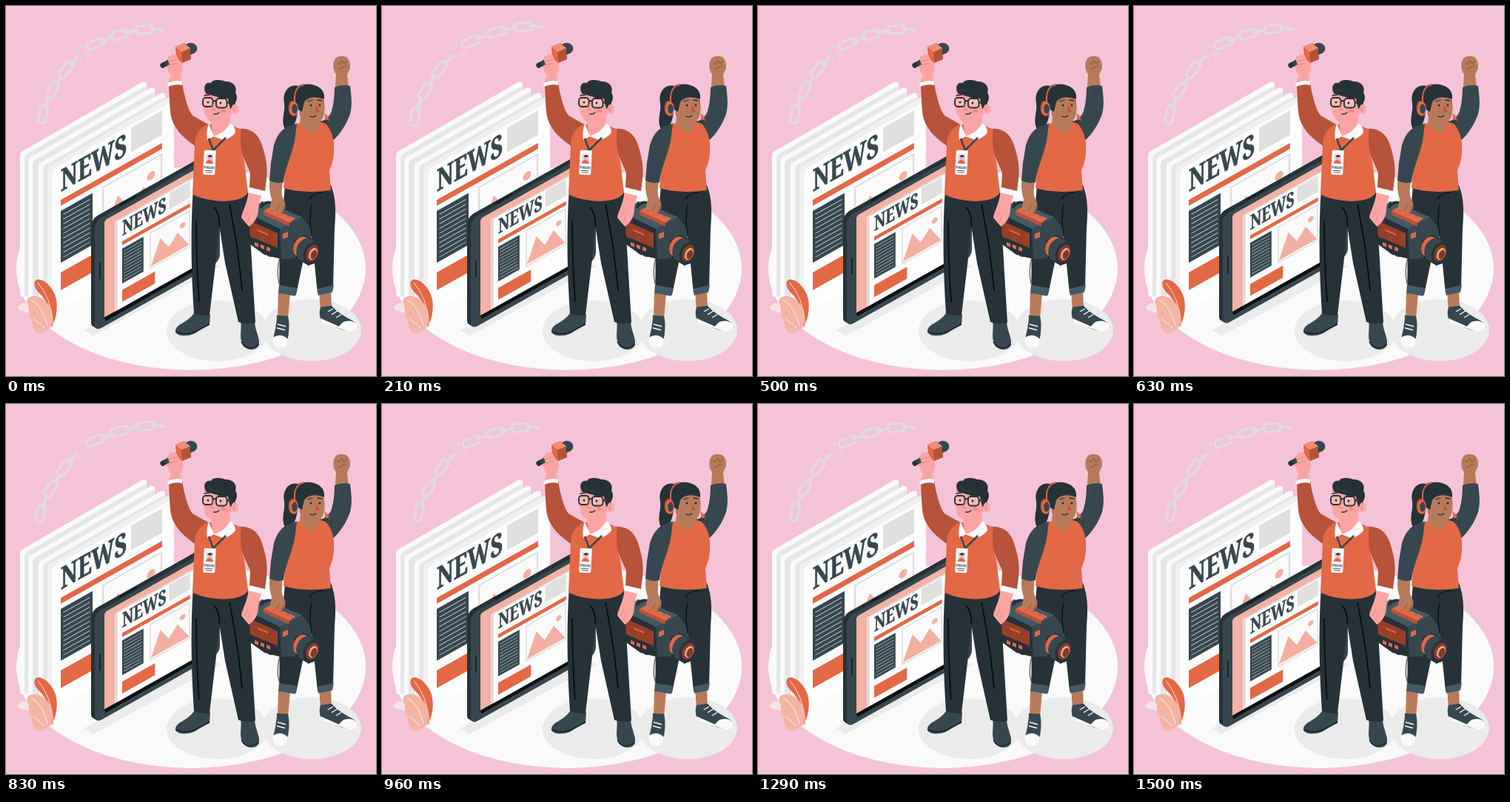
Animation, 500 px wide and 500 px high, one loop 1540 ms. Source, as an HTML page:

```html
<!DOCTYPE html>
<html lang="en">
<head>
<meta charset="utf-8">
<title>News reporters</title>
<style>
html, body { margin: 0; width: 100%; height: 100%; overflow: hidden; background: #f5c3d7; }
svg { display: block; width: 100%; height: 100%; }
.ink { fill: #263238; }
.slate { fill: #37474f; }
.org { fill: #e36846; }
.rust { fill: #b6533a; }
.skin { fill: #fba5a3; }
.brown { fill: #b77a5b; }
.white { fill: #fafafa; }
.grey { fill: #e0e0e0; }
.line { fill: none; stroke: #263238; stroke-width: 1.3; stroke-linecap: round; stroke-linejoin: round; }
.news { font: 700 41px "Noto Serif", serif; fill: #37474f; stroke: #37474f; stroke-width: .7; }
</style>
</head>
<body>
<svg viewBox="0 0 500 500" xmlns="http://www.w3.org/2000/svg">
<defs>
  <g id="page">
    <text class="news" transform="translate(0 -11) scale(.71 1)">NEWS</text>
    <rect class="grey" x="95" y="-44" width="42" height="33"/>
    <rect class="org" width="137" height="8"/>
    <rect class="slate" y="15" width="43" height="70"/>
    <path d="M21.5 21V81" stroke="#b0bec5" stroke-width="36" stroke-dasharray="1.2 5.2"/>
    <rect x="57" y="15" width="79" height="72" fill="#fafafa" stroke="#e0e0e0" stroke-width="2.5"/>
    <path d="M58 83L77 37L94 64L112 45L135 83Z" fill="#f3b0a2"/>
    <circle cx="122" cy="36" r="5.5" fill="#f3b0a2"/>
    <rect class="org" y="98" width="66" height="24"/>
  </g>
  <path id="rim" d="M56 222Q56 218 60 216L219 124Q227 120 227 127V320L64 412Q56 415 56 408Z"/>
  <path id="face" d="M62 226Q62 222 65 220L222 130Q227 127 227 133V320L69 411Q62 415 62 408Z"/>
  <g id="sheet">
    <use href="#rim" fill="#fafafa"/>
    <use href="#face" fill="#e6e6e6"/>
  </g>
  <rect id="link" x="-12" y="-5" width="24" height="10" rx="4"/>
</defs>

<rect width="500" height="500" fill="#f5c3d7"/>
<ellipse class="white" cx="250" cy="355" rx="236" ry="137"/>
<g fill="#ebebeb">
  <ellipse cx="286" cy="439" rx="69" ry="41"/>
  <ellipse cx="413" cy="438" rx="67" ry="42"/>
  <path d="M106 438L118 446L290 352L272 342Z"/>
</g>

<g id="chain" fill="none" stroke="#dfdcdf" stroke-width="3" stroke-linecap="round">
  <use href="#link" transform="translate(50 146) rotate(-78)"/>
  <use href="#link" transform="translate(63 114) rotate(-59)"/>
  <use href="#link" transform="translate(81 86) rotate(-52)"/>
  <use href="#link" transform="translate(121 51) rotate(-22)"/>
  <use href="#link" transform="translate(153 39) rotate(-15)"/>
  <use href="#link" transform="translate(187 32) rotate(-4)"/>
  <path stroke-width="4" d="M53 138L58 123M68 106L75 95M87 79L97 69M129 48L144 42M161 37L177 33M196 31Q206 31 212 33"/>
  <path stroke-width="1.6" d="M99 60L95 57M103 57L102 51M108 57L110 53M105 65L111 68M101 68V73M109 63L114 65"/>
</g>

<use href="#sheet" transform="translate(-37 -20)"/>
<use href="#sheet" transform="translate(-26 -12)"/>
<use href="#sheet" transform="translate(-12 -5)"/>
<use href="#rim" fill="#f0f0f0"/>
<use href="#face" fill="#fdfdfd"/>
<use href="#page" transform="matrix(1 -.562 0 1 74 262)"/>

<g id="leaves">
  <path d="M16 406Q22 399 31 403Q43 413 44 425Q34 414 21 412Q15 411 16 406Z" fill="#f6e4e4"/>
  <path class="org" d="M62 434C69 420 71 403 66 390C60 375 47 367 41 370C35 375 40 384 47 390C56 399 61 414 62 434Z"/>
  <path d="M62 433C64 413 59 399 45 393C33 390 26 395 29 403C33 410 29 417 33 422C37 428 35 435 40 440L46 443Z" fill="#f4b5a5"/>
  <path d="M43 374Q61 394 64 431M34 397Q50 406 56 432M37 422L52 435" fill="none" stroke="#fff" stroke-width=".8"/>
</g>

<g id="phone">
  <g transform="matrix(1 -.562 0 1 115 0)">
    <rect class="ink" y="288" width="169" height="149" rx="9"/>
    <rect class="ink" x="2.500" y="291" width="169" height="149" rx="9"/>
    <rect class="slate" x="5" y="294" width="169" height="149" rx="9"/>
    <rect x="11" y="353" width="2" height="23" rx="1" fill="#17242a"/>
    <path d="M39 291H49M52 291H60" stroke="#111b20" stroke-width="2.500" stroke-linecap="round"/>
    <rect x="18" y="300" width="142" height="137" rx="4" fill="#f2b2a4"/>
    <path d="M18 431H160V437H21Q18 437 18 431Z" fill="#0c1114"/>
    <rect x="32" y="309" width="128" height="122" fill="#e2dedd"/>
    <rect x="36" y="311" width="124" height="120" fill="#fdfdfd"/>
  </g>
  <use href="#page" transform="matrix(.67 -.3765 0 .67 157 318)"/>
</g>

<g id="woman">
  <path class="brown" d="M368 386L384 389L381 423L367 421ZM423 384L439 382L440 410L425 411Z"/>
  <path class="slate" d="M366 418L381 419C384 430 382 445 380 454Q379 461 370 461Q360 460 361 451C363 440 366 430 366 418Z"/>
  <path class="white" d="M361 448Q371 441 381 450Q381 462 370 462Q359 461 361 448Z"/>
  <path class="slate" d="M425 407L440 405C448 414 458 420 468 425Q476 430 472 437Q464 440 454 437L426 425Q422 416 425 407Z"/>
  <path class="white" d="M459 426Q469 424 474 431Q475 440 464 440L426 427L425 422L450 433Q454 427 459 426Z"/>
  <path d="M367 430L378 433M366 435L377 438M435 413L442 409M440 417L448 412M446 421L453 417" stroke="#fff" stroke-width="1.300"/>
  <path class="ink" d="M377 242L439 242C446 260 446 278 444 300L442 382L421 388L413 310L402 342L392 390L369 387C370 360 369 341 371 318Z"/>
  <path d="M369 377L393 381L391 392L368 388ZM421 382L443 377L441 387L422 391Z" fill="#455a64"/>
  <path d="M413 310Q409 288 413 268M410 262Q413 253 428 252" fill="none" stroke="#0d171b" stroke-width="1.500"/>
  <path class="brown" d="M445 110L446 92C441 86 441 75 446 70Q451 66 460 69Q466 74 465 84L461 93L463 110Z"/>
  <path d="M447 76L451 79L454 73L457 79L461 74M449 86Q456 81 460 82" fill="none" stroke="#8d583d" stroke-width="1"/>
  <path class="slate" d="M444 110Q454 105 465 108C467 124 468 135 465 146C460 160 453 171 441 183L420 158C431 155 438 149 440 142Q444 128 444 110Z"/>
  <path class="ink" d="M394 108C382 105 373 117 376 131C378 145 369 157 380 171C389 165 393 154 394 143Z"/>
  <path class="brown" d="M357 232L374 235C373 246 372 254 374 262L361 266C356 254 355 244 357 232Z"/>
  <path class="org" d="M391 159C384 167 380 182 379 200L375 246Q401 254 439 249L437 222C442 211 444 199 443 185C441 170 435 158 425 156Z"/>
  <path class="slate" d="M393 159C376 162 367 171 362 188L358 212L356 236Q365 241 375 238C376 222 385 205 390 183Z"/>
  <path class="brown" d="M398 148L421 151L425 157Q423 166 414 172Q402 168 397 158Z"/>
  <path class="brown" d="M394 118L428 118Q432 133 430 146Q427 158 417 158Q404 158 397 148Z"/>
  <path class="ink" d="M390 137C383 116 390 106 403 106C419 104 432 112 430 126C420 122 409 122 403 130L400 143Z"/>
  <path d="M390 130C389 114 395 107 403 106" fill="none" stroke="#e36846" stroke-width="2"/>
  <ellipse class="rust" cx="387" cy="138" rx="5.500" ry="10"/>
  <ellipse class="org" cx="389" cy="139" rx="6" ry="10"/>
  <ellipse class="slate" cx="390" cy="139" rx="3.800" ry="6.500"/>
  <path class="line" d="M408 129L414 127M421 127L427 128M411 149Q416 151 419 148"/>
  <circle class="ink" cx="412" cy="134" r="1.500"/><circle class="ink" cx="424" cy="134" r="1.500"/>
  <path d="M419 134L424 143L418 144Z" fill="#c05643"/>
  <path class="org" d="M431 145Q437 150 437 156L431 153Z"/>
  <path class="line" d="M436 154Q432 159 425 156"/>
</g>

<g id="camera">
  <path class="slate" d="M327 280L346 264L400 285L410 299L408 325L384 340L356 339L328 320Z"/>
  <path class="ink" d="M327 280L370 300L372 342L349 336L327 320Z"/>
  <path d="M327 280L346 264L400 285L370 301Z" fill="#455a64"/>
  <path d="M329 290L367 307V327L329 311Z" fill="#983f2a"/>
  <path class="org" d="M340 302L354 308V310L340 304ZM336 319L341 321V326L336 324ZM344 322L349 324V329L344 327ZM352 325L357 327V332L352 330Z"/>
  <path class="org" d="M348 277L356 272L391 287L383 293Z"/>
  <path class="rust" d="M348 277L383 293V298L348 282Z"/>
  <path d="M345 271Q350 264 358 266L386 277" fill="none" stroke="#263238" stroke-width="4" stroke-linecap="round"/>
  <path class="brown" d="M361 257L373 257Q379 266 377 274L372 280L366 276L358 278Q355 269 361 257Z"/>
  <path d="M366 276L370 269M373 278L376 270" stroke="#8d583d"/>
  <path class="slate" d="M372 304L392 292L411 301L414 319L390 341L372 342Z"/>
  <path class="org" d="M374 308L381 305V312L374 315Z"/>
  <path class="ink" d="M389 316L403 309L425 320L424 342L409 351L391 340Z"/>
  <ellipse class="org" cx="399" cy="325" rx="10" ry="14" transform="rotate(24 399 325)"/>
  <ellipse class="slate" cx="405" cy="329" rx="12" ry="16" transform="rotate(24 405 329)"/>
  <ellipse class="ink" cx="414" cy="334" rx="11.500" ry="16" transform="rotate(24 414 334)"/>
  <ellipse cx="414" cy="334" rx="8" ry="12" transform="rotate(24 414 334)" fill="#7e3b29"/>
  <ellipse cx="415" cy="335" rx="5.500" ry="8.500" transform="rotate(24 415 335)" fill="#e9a48f"/>
  <ellipse cx="416" cy="336" rx="4" ry="6.500" transform="rotate(24 416 336)" fill="#7e3b29"/>
  <path d="M372 281Q383 270 381 286M370 340Q365 360 369 375" fill="none" stroke="#455a64" stroke-width="1.200"/>
</g>

<g id="man">
  <path class="slate" d="M255 414C249 423 242 426 233 432C227 437 228 443 235 445C248 447 256 443 263 437L275 431L276 417Z"/>
  <path class="slate" d="M317 425C319 437 315 446 319 456C322 465 336 467 341 460C345 451 337 441 336 427Z"/>
  <path d="M229 440Q244 447 262 437L275 430M318 454Q326 468 342 457" fill="none" stroke="#18252b" stroke-width="1.500"/>
  <path class="ink" d="M253 246L327 250C330 270 328 290 330 310L337 428Q325 431 314 427L296 347L288 296L284 341L275 418Q264 419 254 415C252 380 248 320 253 246Z"/>
  <path d="M288 298C289 286 287 278 281 272M302 268C308 300 314 330 319 385M257 290Q257 340 261 400" fill="none" stroke="#080f13" stroke-width="1.800"/>
  <path class="skin" d="M328 250L346 255C343 262 342 267 341 275C341 286 334 295 328 298L323 292L318 286C319 277 326 268 328 250Z"/>
  <path d="M326 291L331 281M322 287L327 277" stroke="#e6837f" stroke-width=".9"/>
  <path class="white" d="M329 244L351 249L347 257L327 252Z"/>
  <path class="rust" d="M313 166C330 164 341 172 346 188C351 204 354 217 352 234L350 250L329 245L330 225L316 194Z"/>
  <path class="rust" d="M220 107L238 104C241 122 246 141 252 148L275 161L260 192C241 180 229 168 224 153C221 143 221 124 220 107Z"/>
  <path class="org" d="M272 160C262 165 255 174 255 187L252 255Q278 266 304 263Q322 261 327 252L322 210C317 196 316 180 318 167L303 160Z"/>
  <path class="skin" d="M277 150L301 140L304 163Q292 178 279 176Z"/>
  <path class="white" d="M274 159L281 176L272 181Q270 169 274 159ZM303 158Q310 162 310 171Q303 180 293 181L280 176Q296 172 303 158Z"/>
  <path d="M274 179L280 195L297 178" fill="none" stroke="#37474f" stroke-width="2.500"/>
  <g transform="rotate(3 275 211)">
    <rect class="white" x="267" y="195" width="16" height="33" rx="1.500"/>
    <rect class="grey" x="270" y="200" width="10" height="13"/>
    <path class="org" d="M270 213Q271 208 275 208Q279 208 280 213Z"/>
    <circle class="skin" cx="275" cy="205" r="2.800"/>
    <path class="ink" d="M272 204Q273 200 278 202L278 204Z"/>
    <text x="275" y="220" text-anchor="middle" font-family="Inter, sans-serif" font-size="4.500" font-weight="700" fill="#37474f">PRESS</text>
    <path d="M269.500 222.500H280M271 225H279" stroke="#546e7a" stroke-width="1.200"/>
  </g>
  <path class="skin" d="M268 113L305 115L305 142C303 153 294 159 283 158C273 157 268 149 267 137Z"/>
  <ellipse class="skin" cx="309" cy="139" rx="5" ry="7"/>
  <path class="ink" d="M271 119C265 111 269 102 277 104C279 99 289 99 297 102C307 102 313 109 310 117C314 123 311 129 309 133Q305 133 304 140L302 135L300 125C291 125 280 121 271 119Z"/>
  <path d="M309 136Q306 138 308 143" fill="none" stroke="#d8817d"/>
  <path class="line" stroke-width="2" d="M268 121L275 120M287 123L296 124"/>
  <g fill="#fcbab6" stroke="#263238" stroke-width="1.900">
    <rect x="266" y="124" width="13.500" height="12" rx="4"/>
    <rect x="284" y="125" width="14.500" height="12.500" rx="4"/>
    <path d="M280 129Q282 127 284 129M298 130L307 132" fill="none"/>
  </g>
  <circle class="ink" cx="273" cy="130" r="1.500"/><circle class="ink" cx="290" cy="131" r="1.500"/>
  <path d="M281 130L278 140L282 141" fill="none" stroke="#e77f7d" stroke-width="1.200"/>
  <path class="line" stroke-width="1.100" d="M281 146Q285 147 288 144"/>
  <ellipse cx="294" cy="142" rx="4" ry="2.500" fill="#f58e8b"/>

  <path class="skin" d="M220 103L223 94C217 87 215 78 219 69C222 65 229 64 235 69C240 75 240 87 236 94L237 104Z"/>
  <path class="white" d="M218 105Q228 99 238 102L238 107Q228 105 219 109Z"/>
  <path d="M212 80L246 62" stroke="#37474f" stroke-width="7" stroke-linecap="round"/>
  <path class="ink" d="M209 78L213 76L217 81L212 84Q207 82 209 78Z"/>
  <path class="org" d="M229 55L241 50L249 57L250 72L238 77L230 70Z"/>
  <path class="rust" d="M237 62L249 57L250 72L238 77Z"/>
  <path d="M229 55L241 50L249 57L237 62Z" fill="#ef8e72"/>
  <path class="slate" d="M243 52Q251 47 257 53Q261 60 254 64L249 66L249 57Z"/>
  <path class="skin" d="M218 71Q225 62 231 67L233 72Q236 77 232 79L222 82Z"/>
  <path d="M220 75L231 72M220 80L232 77" stroke="#e6837f" stroke-width=".9"/>
</g>
</svg>
<script>
const LOOP = 1540, CYCLE = 1500, LIFT = 9.5, SWELL = .085;
const chain = document.getElementById("chain");
const phone = document.getElementById("phone");

// Linear rise from a to b, then linear fall to c.
const pulse = (p, a, b, c) => Math.max(0, Math.min((p - a) / (b - a), (c - p) / (c - b)));

function draw(ms) {
  const p = Math.min(ms % LOOP / CYCLE, 1);
  const lift = LIFT * pulse(p, 0, .5, 1);
  const scale = 1 + SWELL * (pulse(p, 0, .1, .3) + pulse(p, .4, .5, .6));
  phone.setAttribute("transform", `translate(0 ${-lift})`);
  chain.setAttribute("transform", `translate(128 92) scale(${scale}) translate(-128 -92)`);
}

const start = performance.now();
function tick(now) {
  draw(Math.max(0, now - start));
  requestAnimationFrame(tick);
}
draw(0);
requestAnimationFrame(tick);
</script>
</body>
</html>
```
